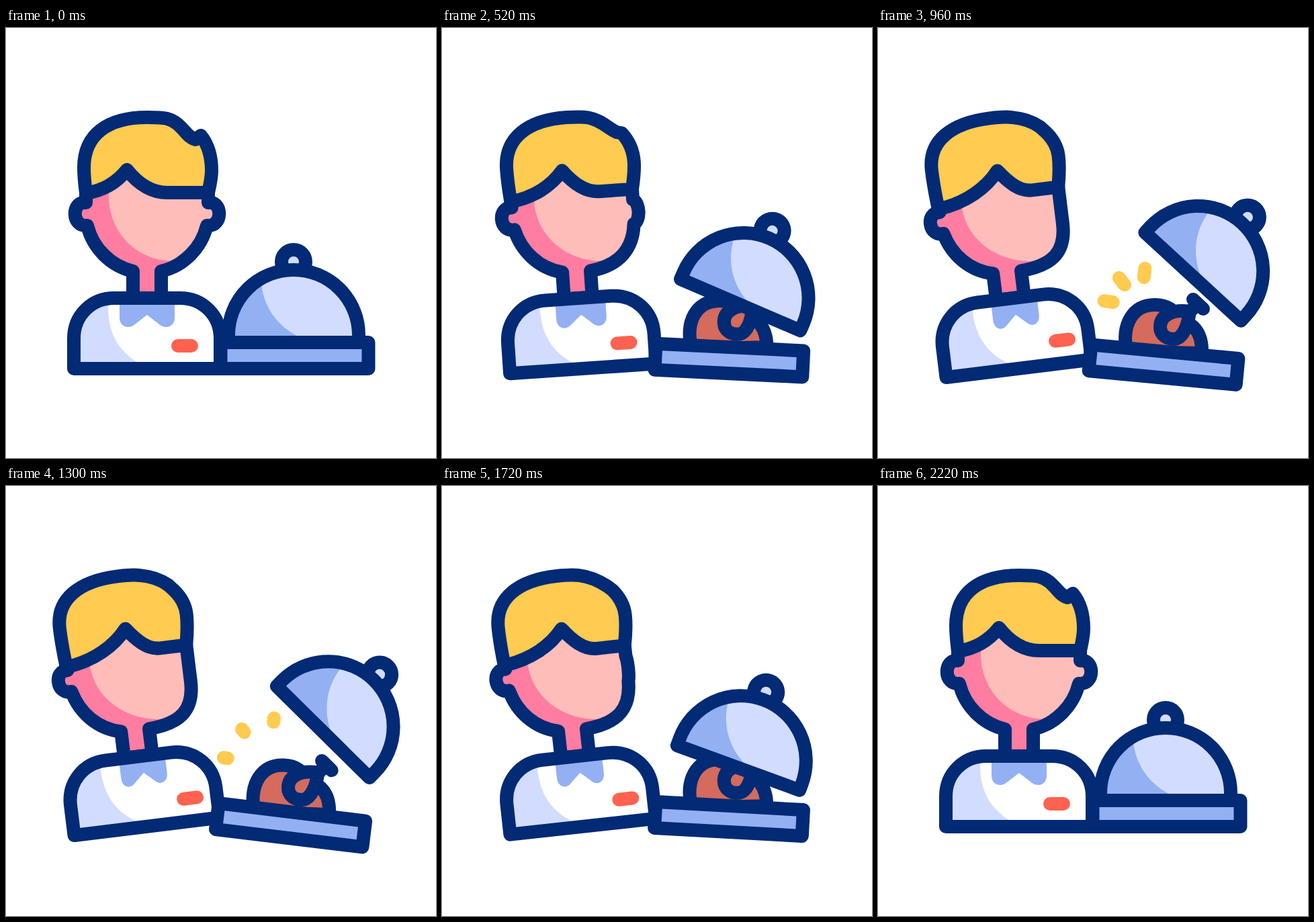
Animation, 640 px wide and 640 px high, one loop 2.4 s. Source, as an HTML page:

```html
<!DOCTYPE html>
<html lang="en">
<head>
<meta charset="utf-8">
<title>Waiter</title>
<style>
  html, body { margin: 0; width: 100%; height: 100%; overflow: hidden; background: #fff; }
  svg { display: block; width: 100%; height: 100%; }
  .line { stroke: #022a75; stroke-width: 20; stroke-linecap: round; stroke-linejoin: round; }
  .open { fill: none; }
  .pale { fill: #d2dcff; }
  .blue { fill: #93b0f3; }
  .meat { fill: #d46b5c; }
  .spark { stroke: #ffcb50; stroke-width: 20; stroke-linecap: round; }
</style>
</head>
<body>
<svg viewBox="0 0 640 640">
  <defs>
    <clipPath id="faceClip"><path data-shape="face"/></clipPath>
    <clipPath id="bodyClip"><path d="M101,507V462C101,428 127,402 161,402H259C293,402 319,428 319,462V507Z"/></clipPath>
    <clipPath id="domeClip"><path d="M331,468V457A97 97 0 0 1 525,457V468Z"/></clipPath>
  </defs>

  <g id="man">
    <path data-shape="face" fill="#ff7da1"/>
    <g clip-path="url(#faceClip)"><path data-shape="light" fill="#ffbdb9"/></g>
    <path data-shape="face" class="line open"/>
    <path data-shape="hair" class="line" fill="#ffcb50"/>

    <g clip-path="url(#bodyClip)">
      <rect x="90" y="390" width="240" height="130" fill="#fff"/>
      <path class="pale" d="M90,390H152V412C151,450 165,480 198,499V520H90Z"/>
      <path id="collar" class="blue" d="M169,402V431C169,445 183,449 192,441L210,427L228,441C237,449 251,445 251,431V402Z"/>
      <rect id="badge" x="246" y="463" width="40" height="20" rx="10" fill="#ff6250"/>
    </g>
    <path class="line open" d="M101,507V462C101,428 127,402 161,402H259C293,402 319,428 319,462V507Z"/>
  </g>

  <g id="tray">
    <g transform="rotate(-5.4 283 447)">
      <path class="line meat" d="M370,482C362,440 380,412 412,412C430,412 442,420 448,436C470,438 483,455 482,484Z"/>
      <path class="line meat" d="M464,422C438,418 420,428 420,445C420,457 430,463 440,463C450,463 460,452 464,422Z"/>
      <path class="line open" d="M462,424L476,411M469,404L484,418"/>
    </g>
    <rect class="line blue" x="319.5" y="468" width="220" height="39"/>
  </g>

  <g id="lid">
    <circle class="line pale" cx="428" cy="348" r="18"/>
    <g clip-path="url(#domeClip)">
      <rect class="pale" x="320" y="350" width="216" height="120"/>
      <path class="blue" d="M320,350H380V378C382,412 402,444 439,461V470H320Z"/>
    </g>
    <path class="line open" d="M331,468V457A97 97 0 0 1 525,457V468Z"/>
  </g>

  <g id="sparks"></g>
</svg>
<script>
const LOOP = 2400;
const $ = id => document.getElementById(id);

// Each shape: facing front, then turned aside.
const shapes = {
  face: [
    'M119,200L119,260C97,257 97,297 121,294C129,327 155,354 189,362V402H231V362C265,354 291,327 299,294C323,297 323,257 301,260V200',
    'M119,200L121,262C100,259 100,297 123,294C131,327 155,354 189,362V402H231V363C281,361 301,341 301,300C301,290 301,272 301,262V200'
  ],
  light: [
    'M153,195V250C153,305 195,347 250,347H340V195Z',
    'M155,195V257C155,308 200,351 262,352H340V195Z'
  ],
  hair: [
    'M119,246C117,230 116,220 116,208C116,158 152,133 210,133C222,133 232,133 240,135C262,141 268,163 282,166L290,160C302,175 306,195 306,212C306,224 303,236 301,245H240C215,245 195,230 180,211C165,230 145,242 119,246Z',
    'M120,257C118,235 117,215 117,199C117,155 154,132 212,132C224,132 235,132 246,135C260,138 275,145 285,154L292,162C301,173 307,186 307,200C307,215 304,232 301,246H262C243,246 228,230 214,211C195,234 162,253 120,257Z'
  ]
};

// Keys are [ms, value].
const turnKeys = [[200, 0], [800, 1], [1600, 1], [2200, 0]];
const trayKeys = [[200, 0], [800, 5.05], [1400, 7.05], [2000, 0]];
const lidKeys = [[200, 0], [800, 42.1], [1400, 44.8], [2000, 0]];

// Outer end and outward direction of each spark.
const sparks = [
  { x: 324, y: 404.3, dx: -0.99, dy: -0.15 },
  { x: 351, y: 362, dx: -0.62, dy: -0.78 },
  { x: 398.9, y: 345.5, dx: 0.12, dy: -0.99 }
];
const SPARK_REACH = 35.4;

for (const s of sparks) {
  s.el = document.createElementNS('http://www.w3.org/2000/svg', 'line');
  s.el.setAttribute('class', 'spark');
  $('sparks').append(s.el);
}

const clamp = u => Math.min(1, Math.max(0, u));
const ease = u => u * u * (3 - 2 * u);

function valueAt(keys, t) {
  let value = keys[0][1];
  for (let i = 1; i < keys.length; i++) {
    const [t0, a] = keys[i - 1], [t1, b] = keys[i];
    if (t >= t0) value = a + (b - a) * ease(clamp((t - t0) / (t1 - t0)));
  }
  return value;
}

function morph([from, to], p) {
  const ends = to.match(/[\d.]+/g);
  let i = 0;
  return from.replace(/[\d.]+/g, n => (+n + (ends[i++] - n) * p).toFixed(2));
}

const place = (id, transform) => $(id).setAttribute('transform', transform);

function drawMan(turn) {
  for (const name in shapes) {
    const d = morph(shapes[name], turn);
    document.querySelectorAll(`[data-shape=${name}]`).forEach(el => el.setAttribute('d', d));
  }
  place('man', `rotate(${-7 * turn} 208 509)`);
  place('collar', `translate(${210 + 5 * turn} 0) scale(${1 - 0.16 * turn} 1) translate(-210 0)`);
  place('badge', `translate(${13 * turn} 0)`);
}

function drawDish(tilt, open) {
  const lift = open / 44.8;
  place('tray', `rotate(${tilt} 283 447)`);
  place('lid', `translate(${16 * lift} ${-34 * lift}) rotate(${open} 525 468)`);
}

function drawSparks(t) {
  $('sparks').style.display = t > 800 && t < 1400 ? '' : 'none';
  const head = SPARK_REACH * (1 - clamp((t - 800) / 250));
  const tail = SPARK_REACH * (1 - clamp((t - 800) / 600));
  for (const { el, x, y, dx, dy } of sparks) {
    el.setAttribute('x1', x - dx * head);
    el.setAttribute('y1', y - dy * head);
    el.setAttribute('x2', x - dx * tail);
    el.setAttribute('y2', y - dy * tail);
  }
}

function frame() {
  const t = performance.now() % LOOP;
  drawMan(valueAt(turnKeys, t));
  drawDish(valueAt(trayKeys, t), valueAt(lidKeys, t));
  drawSparks(t);
  requestAnimationFrame(frame);
}
frame();
</script>
</body>
</html>
```
